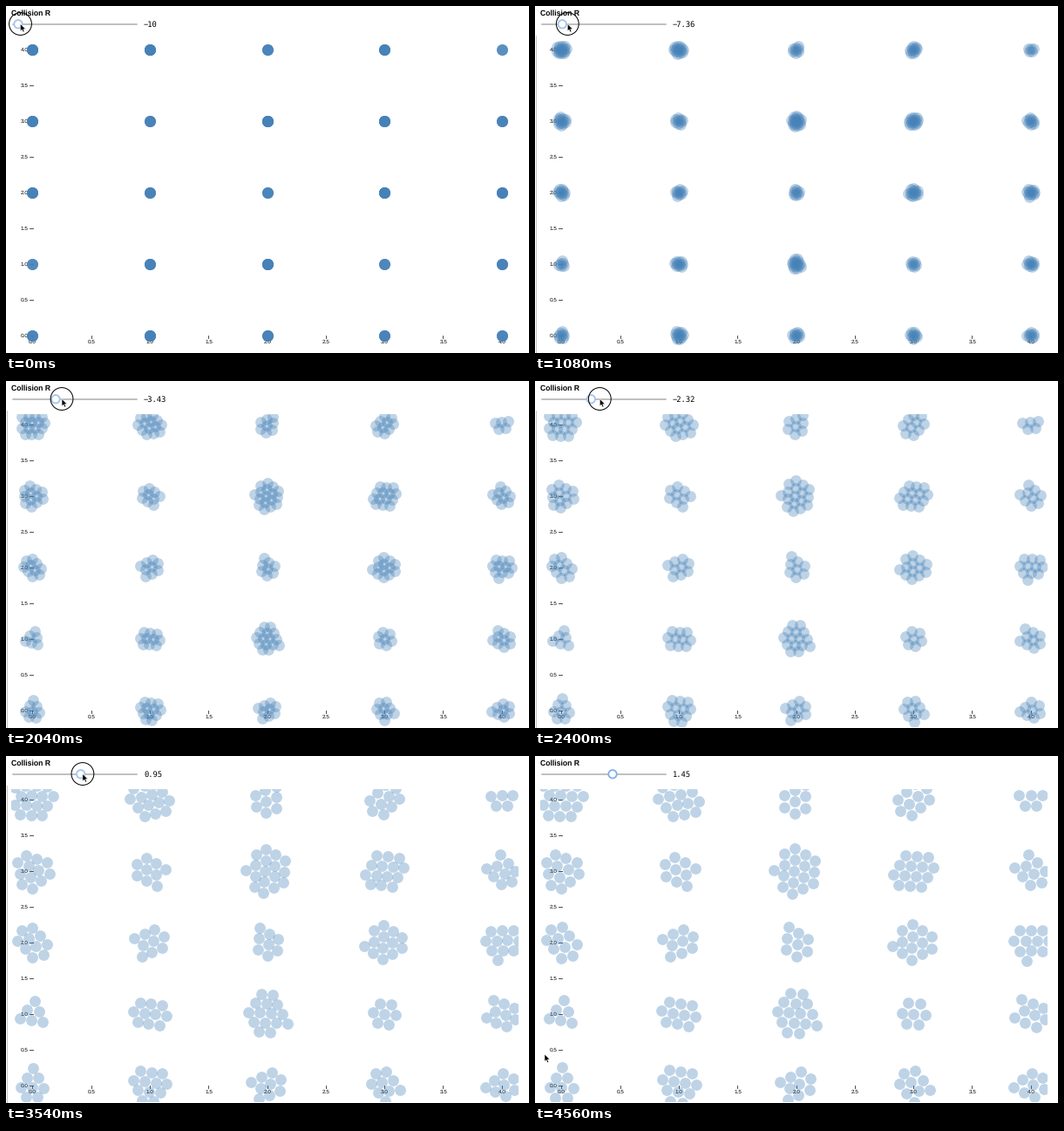
Write a matplotlib script that moves like this. It is 600x398 px and loops after 4620 ms.

```python
import numpy as np
import matplotlib.pyplot as plt
from matplotlib.animation import FuncAnimation
from matplotlib.patches import Circle, Polygon, Rectangle

plt.rcParams["text.hinting"] = "none"

W, H, DPI = 600, 398, 100
FRAMES, STEP = 77, 60
PX = 72 / DPI                      # points per pixel

X0, DX = 30.3, 134.6               # plot scales
Y0, DY = 377.5, 81.85
DOT = 12.8                         # dot diameter
GAP = 1.19                         # dot spacing per slider unit
R_MIN = -10

# Dots in each cluster, from the top row of the chart down
COUNTS = np.array([[15, 14, 8, 10, 5],
                   [12, 9, 17, 14, 9],
                   [10, 9, 8, 13, 11],
                   [6, 10, 15, 7, 9],
                   [8, 12, 9, 9, 8]])

# Key times, with the slider value and how far the pointer is ahead of the thumb
TIMES = [0, 1080, 1680, 2400, 3000, 3540, 3960]
VALUES = [R_MIN, -7.36, -4.55, -2.32, -.73, .95, 1.45]
LEADS = [2.5, 6, 4, 10, 8.7, 2.2, 1]
RELEASE, LEAVE, END = 4260, 4320, 4560


def slider(t):
    return round(float(np.interp(t, TIMES, VALUES)), 2)


def thumb_x(t):
    return 14 + 6.55 * (slider(t) - R_MIN)


def pointer(t):
    """Follows the thumb, then moves off to the lower left."""
    start = np.array([thumb_x(t) + np.interp(t, TIMES, LEADS), 20.5])
    u = np.clip((t - LEAVE) / (END - LEAVE), 0, 1)
    return start + u * (np.array([11, 342]) - start)


def packing(n, rng):
    """A compact piece of a unit hexagonal lattice, turned at random."""
    a, b = np.meshgrid(np.arange(-5, 6), np.arange(-5, 6))
    sites = np.column_stack([(a + b / 2).ravel(), (b * np.sqrt(3) / 2).ravel()])
    sites = sites - rng.uniform(-.5, .5, 2)
    pts = sites[np.argsort(np.hypot(*sites.T))[:n]]
    tilt = rng.uniform(0, np.pi / 3)
    c, s = np.cos(tilt), np.sin(tilt)
    return pts @ np.array([[c, s], [-s, c]])


def relax(q, rounds=6):
    """Pull dots to the middle and push overlapping pairs apart."""
    for _ in range(rounds):
        q = q * .985
        diff = q[:, None] - q[None]
        dist = np.hypot(diff[..., 0], diff[..., 1])
        np.fill_diagonal(dist, 9)
        push = np.clip(1 - dist, 0, None) / np.maximum(dist, .01)
        q = q + .35 * (diff * push[..., None]).sum(1)
    return q - q.mean(0)


def simulate():
    rng = np.random.default_rng(4)
    tracks = []
    for (row, col), n in np.ndenumerate(COUNTS):
        centre = np.array([X0 + DX * col, Y0 - DY * (4 - row)])
        q = packing(n, rng)
        track = []
        for t in np.arange(FRAMES) * STEP:
            shake = .04 if t < TIMES[-1] else .015
            q = relax(q + rng.normal(0, shake, q.shape))
            track.append(centre + q * GAP * (slider(t) - R_MIN))
        tracks.append(track)
    return np.concatenate(tracks, axis=1)


tracks = simulate()

fig = plt.figure(figsize=(W / DPI, H / DPI), dpi=DPI, facecolor="white")
ax = fig.add_axes([0, 0, 1, 1])
ax.set(xlim=(0, W), ylim=(H, 0))
ax.axis("off")


def label(x, y, text, px, **kw):
    kw.setdefault("family", "Liberation Sans")
    return ax.text(x, y, text, fontsize=px * PX, va="baseline", **kw)


def line(xs, ys, px, color, **kw):
    return ax.plot(xs, ys, color=color, lw=px * PX, **kw)[0]


# Axes
for v in np.arange(0, 4.5, .5):
    x, y = X0 + DX * v, Y0 - DY * v
    line([27, 30.5], [y, y], .8, "#222222", zorder=1)
    line([x, x], [377.5, 381], .8, "#222222", zorder=1)
    label(25.4, y + 2.3, f"{v:.1f}", 6.4, ha="right", zorder=1)
    label(x + .3, 387.3, f"{v:.1f}", 6.4, ha="center", zorder=1)

# Dots, cut off at the edge of the chart
dots = ax.scatter(*tracks[0].T, s=(DOT * PX) ** 2, color="#4682b8",
                  alpha=.35, linewidths=0, zorder=2)
dots.set_clip_path(Rectangle((6, 38), 581, 357.5, transform=ax.transData))

# Slider
label(6.3, 10.7, "Collision R", 8.6, weight="bold", zorder=4)
line([8, 150], [20.6, 20.6], 2, "#c0c0c0", solid_capstyle="round", zorder=4)
thumb = ax.add_patch(Circle((14, 20.8), 4.7, fc="white", ec="#a3c4ee",
                            lw=1.8 * PX, zorder=5))
value = label(158, 24.2, "", 8.8, family="DejaVu Sans Mono", zorder=4)
edge = line([.5, .5], [34, H], 1, "#c4c4c4", zorder=3)

# Pointer
ring = ax.add_patch(Circle((0, 0), 12.9, fill=False, ec="black",
                           lw=PX, zorder=6))
ARROW = np.array([(0, 0), (0, 8.4), (1.9, 6.6), (3.2, 9.6), (4.6, 9),
                  (3.4, 6.1), (5.9, 5.9)])
arrow = ax.add_patch(Polygon(ARROW, fc="black", ec="white", lw=.5 * PX, zorder=7))


def draw(k):
    t = k * STEP
    held = t < RELEASE
    tip = pointer(t)
    dots.set_offsets(tracks[k])
    thumb.center = (thumb_x(t), 20.8)
    thumb.set_edgecolor("#a3c4ee" if held else "#7fb0e6")
    value.set_text(f"{slider(t):g}".replace("-", "\u2212"))
    ring.center = tuple(tip)
    ring.set_visible(held)
    arrow.set_xy(ARROW + tip)
    edge.set_alpha(float(np.clip(min(t, RELEASE + 180 - t) / 180, 0, 1)))
    return dots, thumb, value, ring, arrow, edge


anim = FuncAnimation(fig, draw, frames=FRAMES, interval=STEP, repeat=True,
                     repeat_delay=0, blit=False)
plt.show()
```
